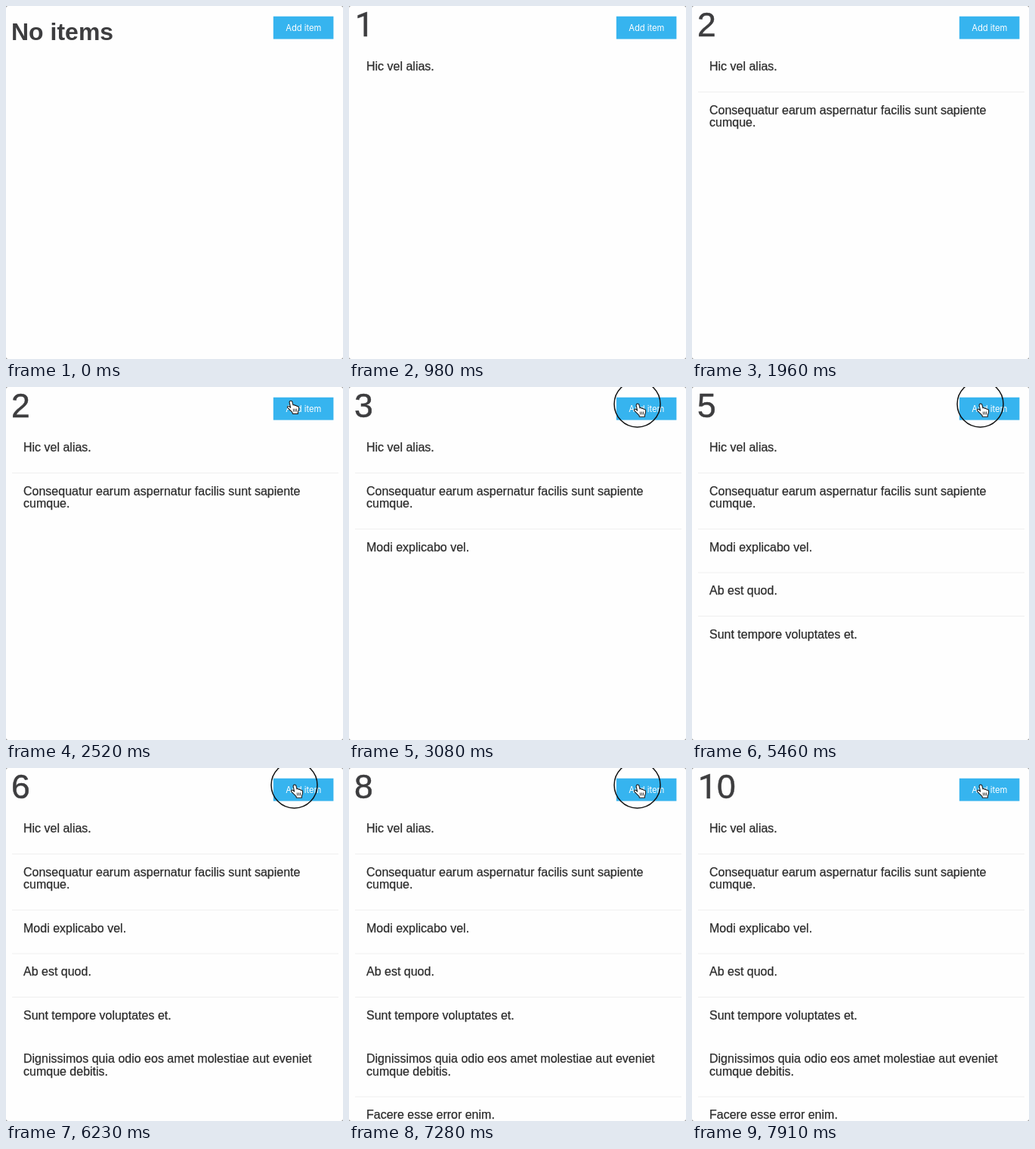
Write an HTML page that moves like this. It is 446x466 px and loops after 8000 ms.

```html
<!DOCTYPE html>
<html lang="en">
<head>
<meta charset="utf-8">
<title>Item list</title>
<style>
html, body { margin: 0; width: 100%; height: 100%; overflow: hidden; background: #8c8c8c; }
svg { display: block; width: 446px; height: 466px; font-family: "Liberation Sans", Arial, sans-serif; }
#count { font-size: 44.5px; fill: #3d3d3f; stroke: #3d3d3f; stroke-width: .5; }
#count.empty { font-size: 32px; font-weight: 700; stroke: none; }
.one { font-family: Roboto, sans-serif; }
#list { font-size: 16px; fill: #2c2c2c; }
#list text { stroke: #2c2c2c; stroke-width: .25; }
#list path { stroke: #efefef; }
.button { font: 400 11.2px Inter, sans-serif; fill: #fff; text-anchor: middle; }
#ring { fill: none; stroke: #111; stroke-width: 1.5; }
</style>
</head>
<body>
<svg viewBox="0 0 446 466">
  <rect width="446" height="466" rx="3" fill="#fefefe"/>
  <text id="count"></text>
  <g id="list"></g>

  <rect x="353.8" y="13.7" width="79.6" height="29.9" fill="#36b4ef"/>
  <text class="button" x="393.8" y="33">Add item</text>

  <g id="hand" stroke="#222" stroke-linejoin="round">
    <path fill="#fff" d="M5 1.2C6.3 .8 6.9 1.8 7.2 3L8 6.2C9 5.6 10 6 10.3 6.8C11.2 6.3 12.2 6.7 12.5 7.6C13.6 7.2 14.6 8 14.8 9.3C15 11 14.6 12.5 13.8 14L13.7 16.5H7.5L7.2 15C5.5 13 4 11.8 1.6 9.4C.6 8 2 7 3.3 7.7L5 9.2L3.7 3.2C3.5 2.2 4 1.4 5 1.2Z"/>
    <path fill="none" stroke-width=".8" d="M8.3 10.5L8.6 14M10.2 10.5L10.4 14M12.1 10.5V14"/>
  </g>
  <circle id="ring" cx="381.5" cy="22.5" r="30.5"/>
</svg>
<script>
const LOOP = 8000, STEP = 70;
const items = [
  "Hic vel alias.",
  "Consequatur earum aspernatur facilis sunt sapiente\ncumque.",
  "Modi explicabo vel.",
  "Ab est quod.",
  "Sunt tempore voluptates et.",
  "Dignissimos quia odio eos amet molestiae aut eveniet\ncumque debitis.",
  "Facere esse error enim."
];
const added = [980, 1960, 2730, 3150, 3290, 5530, 6300, 7000, 7350, 7840];
// Ring on and off times
const presses = [
  [2660, 2730], [3080, 3150], [3220, 3290], [5460, 5530],
  [6230, 6370], [6860, 7000], [7280, 7420], [7770, 7910]
];
const move = { start: 2030, end: 2590, from: [336, -10], to: [376, 20.8] };

const $ = id => document.getElementById(id);
const show = (el, on) => el.setAttribute("visibility", on ? "visible" : "hidden");

function buildList() {
  let y = 85;
  items.forEach((item, i) => {
    const lines = item.split("\n");
    const rule = i && i !== 5 ? `<path d="M8 ${y - 29}H440"/>` : "";
    const text = lines.map((line, n) => `<text x="23" y="${y + n * 16.5}">${line}</text>`).join("");
    $("list").insertAdjacentHTML("beforeend", `<g>${rule}${text}</g>`);
    y += 41 + 16.5 * lines.length;
  });
}

function setCount(n) {
  const el = $("count");
  el.setAttribute("class", n ? "" : "empty");
  el.setAttribute("x", 7);
  el.setAttribute("y", n ? 39.5 : 45);
  el.innerHTML = n ? String(n).replace("1", '<tspan class="one" dx="1">1</tspan>') : "No items";
}

let shown = -1;
function draw(time) {
  const t = Math.floor(time % LOOP / STEP) * STEP;

  const n = added.filter(at => t >= at).length;
  if (n !== shown) {
    setCount(n);
    [...$("list").children].forEach((el, i) => show(el, i < n));
    shown = n;
  }

  const p = Math.min(1, (t - move.start) / (move.end - move.start));
  const [x, y] = move.from.map((a, i) => a + (move.to[i] - a) * p);
  $("hand").setAttribute("transform", `translate(${x} ${y}) scale(1.12)`);
  show($("hand"), p > 0);
  show($("ring"), presses.some(([on, off]) => t >= on && t < off));
}

buildList();
draw(0);
const begin = performance.now();
requestAnimationFrame(function tick(now) {
  draw(Math.max(0, now - begin));
  requestAnimationFrame(tick);
});
</script>
</body>
</html>
```
